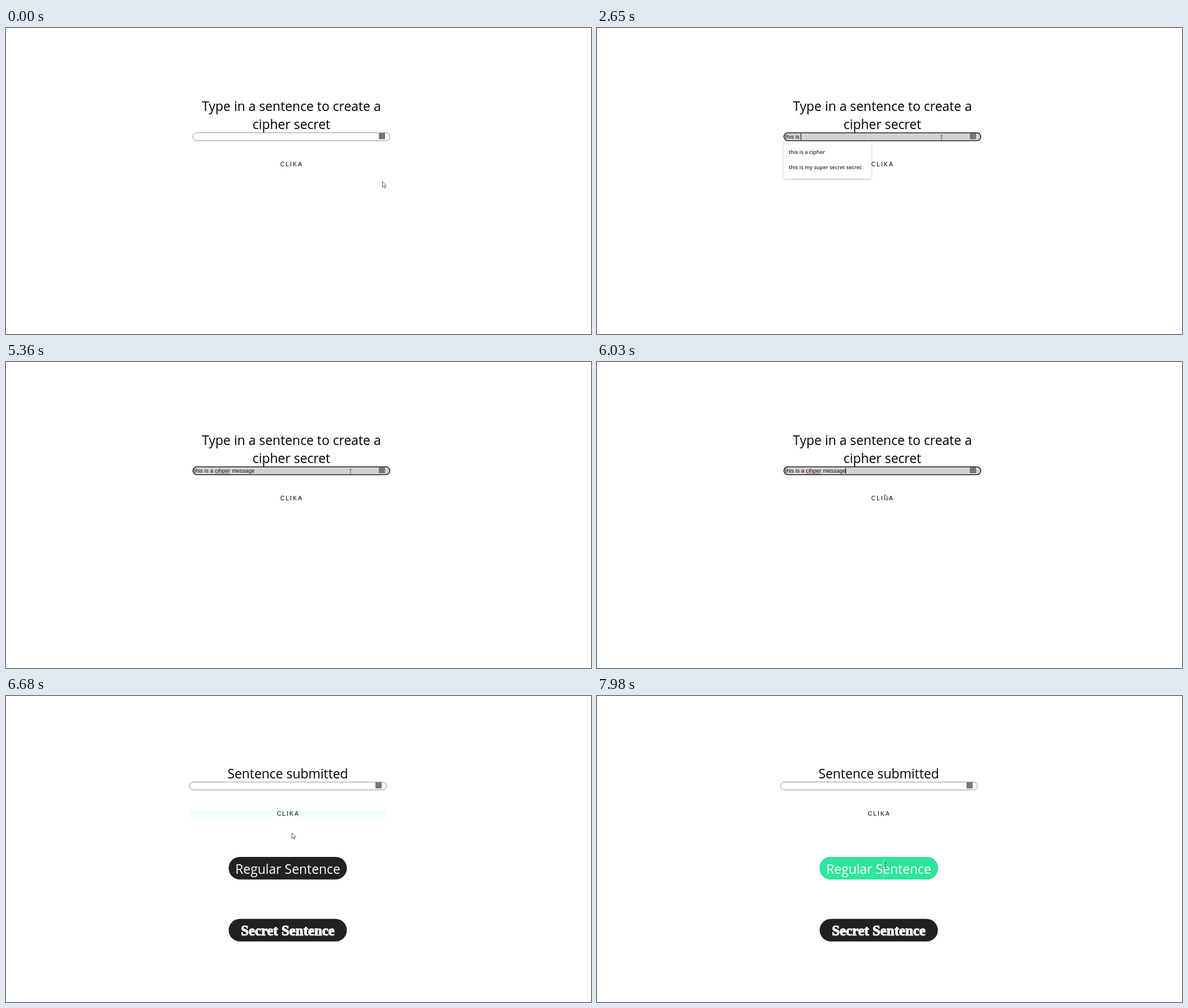
An HTML page that plays this animation: 1034x542 px, repeating every 8000 ms.

```html
<!DOCTYPE html>
<html lang="en">
<head>
<meta charset="utf-8">
<title>Cipher form</title>
<style>
  html, body { margin: 0; width: 100%; height: 100%; overflow: hidden; background: #fff; }
  svg { display: block; width: 100%; height: 100%; }
  text { white-space: pre; }
  .title { font: 22.9px "Open Sans", "Noto Sans", sans-serif; text-anchor: middle; }
  .typed { font: 10px "Liberation Sans", Arial, sans-serif; fill: #111; text-rendering: geometricPrecision; }
  .label { font: 10.5px "Liberation Sans", Arial, sans-serif; letter-spacing: 2px; }
  .item { font: 600 9.2px "Open Sans", "Noto Sans", sans-serif; fill: #282828; }
  .secret { font: bold 24.8px "Liberation Serif", "Noto Serif", serif; text-anchor: middle;
            fill: #fff; stroke: #fff; stroke-width: 1.2; }
  #panel { filter: drop-shadow(0 1px 1.5px rgba(0, 0, 0, .3)); }
</style>
</head>
<body>
<svg viewBox="0 0 1034 542" xmlns="http://www.w3.org/2000/svg">
  <rect width="1034" height="542" fill="#fff"/>
  <g id="ask" class="title">
    <text x="504.5" y="147">Type in a sentence to create a</text>
    <text x="504.5" y="179">cipher secret</text>
  </g>

  <g id="form">
    <rect id="button" x="330" y="234.5" width="349" height="14" rx="7" fill="#2ee59d"/>
    <text id="label" class="label" x="484.7" y="245">CLIKA</text>
    <g id="list">
      <rect id="panel" x="330" y="198" rx="3" fill="#fff"/>
      <g id="items"></g>
    </g>
    <rect id="field" x="330.4" y="185.6" width="348" height="14" rx="7"/>
    <text id="typed" class="typed" x="332.5" y="196"></text>
    <path id="wave" fill="none" stroke="#e0282e" stroke-width=".9"/>
    <rect id="caret" y="187" width="1" height="11" fill="#000"/>
    <rect x="659" y="186" width="11" height="11" rx="1" fill="#777"/>
  </g>

  <g id="done">
    <text class="title" x="498" y="145.5">Sentence submitted</text>
    <rect x="393.5" y="285" width="209" height="40" rx="20" fill="#212121"/>
    <rect id="hover" x="393.5" y="285" width="209" height="40" rx="20" fill="#2ee59d"/>
    <text class="title" x="498" y="315" fill="#fff">Regular Sentence</text>
    <rect id="mark" x="506" y="289" width="1" height="31" fill="#cfd8d2"/>
    <rect x="393.5" y="394.8" width="209" height="40" rx="20" fill="#212121"/>
    <text class="secret" x="498" y="423.5">Secret Sentence</text>
  </g>

  <path id="arrow" d="M0 0V9.6L2.2 7.6 3.8 11.2 5.3 10.5 3.8 7 6.7 6.8Z"
        fill="#fff" stroke="#333" stroke-width=".8" stroke-linejoin="round"/>
  <path id="beam" d="M-2 -5H-.5L0 -4.5 .5 -5H2M0 -4.5V4.5M-2 5H-.5L0 4.5 .5 5H2"
        fill="none" stroke="#444" stroke-width=".9"/>
</svg>

<script>
const LOOP = 8000, SUBMIT = 6500, BLUR = 6420;
const MESSAGE = "this is a cihper message";
const LONG = "this is my super secret secret", SHORT = "this is a cipher";

// [time, characters typed]
const KEYS = [[0, 0], [1460, 1], [2030, 4], [2230, 5], [2310, 6], [2540, 7], [2650, 8],
  [2910, 9], [3010, 10], [3210, 11], [3400, 12], [3494, 14], [3589, 15], [3683, 16],
  [3777, 17], [3871, 18], [3966, 19], [4060, 20], [4280, 21], [4550, 22], [4645, 23], [4740, 24]];

// [time, suggestions]
const LISTS = [[0, []],
  [770, ["refresha", "I am a sentence", "fendrel", "save", SHORT, "gret"]],
  [1550, [SHORT, LONG, "test", "this"]],
  [1850, [LONG, SHORT]], [2030, [SHORT, LONG]],
  [3010, [SHORT]], [3494, []]];

const el = {};
document.querySelectorAll("[id]").forEach(n => el[n.id] = n);

const set = (node, attrs) => { for (const k in attrs) node.setAttribute(k, attrs[k]); };
const show = (node, on) => node.setAttribute("visibility", on ? "inherit" : "hidden");
const clamp = x => Math.max(0, Math.min(1, x));
const mix = (a, b, k) => a + (b - a) * k;
const latest = (rows, t) => rows.filter(r => r[0] <= t).pop()[1];

// Number of steps taken out of n, the first at a and the last at b
function steps(t, a, b, n) {
  return t < a ? 0 : Math.min(n, Math.floor((t - a) / (b - a) * (n - 1) + 1e-6) + 1);
}
// Time held at the last step
function held(t, a, b, n) {
  return a + (steps(t, a, b, n) - 1) * (b - a) / (n - 1);
}
// CSS "ease" timing
function ease(x) {
  if (x <= 0 || x >= 1) return clamp(x);
  const bez = (p, q, s) => 3 * p * s * (1 - s) ** 2 + 3 * q * s * s * (1 - s) + s ** 3;
  let lo = 0, hi = 1;
  for (let i = 0; i < 20; i++) {
    const m = (lo + hi) / 2;
    if (bez(.25, .25, m) < x) lo = m; else hi = m;
  }
  return bez(.1, 1, lo);
}
const smooth = k => k * k * (3 - 2 * k);

const pen = document.createElement("canvas").getContext("2d");
pen.font = '10px "Liberation Sans", Arial, sans-serif';
const endOf = n => 332.5 + pen.measureText(MESSAGE.slice(0, n)).width;

function drawWave() {
  let d = "";
  for (let x = endOf(10), up = 0; x < endOf(16); x += 1.5, up = 1 - up)
    d += (d ? "L" : "M") + x.toFixed(1) + " " + (197.3 + up);
  el.wave.setAttribute("d", d);
}

let shown = null;
function drawList(names) {
  show(el.list, names.length);
  if (names === shown) return;
  shown = names;
  set(el.panel, { width: names.includes(LONG) ? 155 : 146, height: 14.2 + 27.4 * names.length });
  el.items.replaceChildren(...names.map((name, i) => {
    const node = document.createElementNS("http://www.w3.org/2000/svg", "text");
    set(node, { class: "item", x: 339, y: 223 + 27.4 * i });
    node.textContent = name;
    return node;
  }));
}

function pointer(t) {
  if (t < 5640) {
    const k = smooth(steps(t, 80, 570, 6) / 6);
    return [mix(665.5, 609, k), mix(272.5, 195, k)];
  }
  if (t < SUBMIT) {
    const n = steps(t, 5640, 6420, 9);
    if (n <= 5) {
      const k = smooth(n / 5);
      return [mix(609, 508.5, k), mix(195, 234.5, k)];
    }
    const k = (n - 5) / 4;
    return [mix(508.5, 505.5, k), mix(234.5, 242.5, k)];
  }
  const k = smooth(steps(t, 7590, 7980, 5) / 5);
  return [mix(505.5, 510, k), mix(242.5, 300, k)];
}

function caretOn(t) {
  if (t < 770 || t >= BLUR) return false;
  return !(t >= 1270 && t < 1460) && !(t >= 5360 && t < 5835);
}

function buttonGlow(t) {
  if (t < 6030) return 0;
  if (t < SUBMIT) return ease((held(t, 5640, 6420, 9) - 6030) / 300);
  return 1 - ease((held(t, 6500, 6860, 5) - 6475) / 300);
}

function render(t) {
  const sent = t >= SUBMIT, focus = t >= 770 && t < BLUR;
  const count = sent ? 0 : latest(KEYS, t);
  show(el.ask, !sent);
  show(el.done, sent);
  el.form.setAttribute("transform", sent ? "translate(-6 -33.3)" : "");

  set(el.field, focus
    ? { fill: "#d2d2d2", stroke: "#000", "stroke-width": 1.4 }
    : { fill: "#fff", stroke: "#858585", "stroke-width": .9 });
  el.typed.textContent = MESSAGE.slice(0, count);
  show(el.wave, count > 16);
  show(el.caret, caretOn(t));
  el.caret.setAttribute("x", Math.floor(endOf(count)));
  drawList(latest(LISTS, t));

  const glow = buttonGlow(t), grey = Math.round(255 * glow);
  el.button.setAttribute("opacity", glow);
  el.label.setAttribute("fill", `rgb(${grey},${grey},${grey})`);
  el.hover.setAttribute("opacity", t < 7687 ? 0 : ease((held(t, 7590, 7980, 5) - 7680) / 300));
  show(el.mark, t >= 7975);

  const [x, y] = pointer(t);
  const overText = sent ? y > 285 : y < 200;
  const place = `translate(${x.toFixed(2)} ${y.toFixed(2)})`;
  show(el.arrow, !overText);
  show(el.beam, overText);
  set(el.arrow, { transform: place });
  set(el.beam, { transform: place });
}

function frame() {
  render(performance.now() % LOOP);
  requestAnimationFrame(frame);
}
drawWave();
frame();
</script>
</body>
</html>
```
